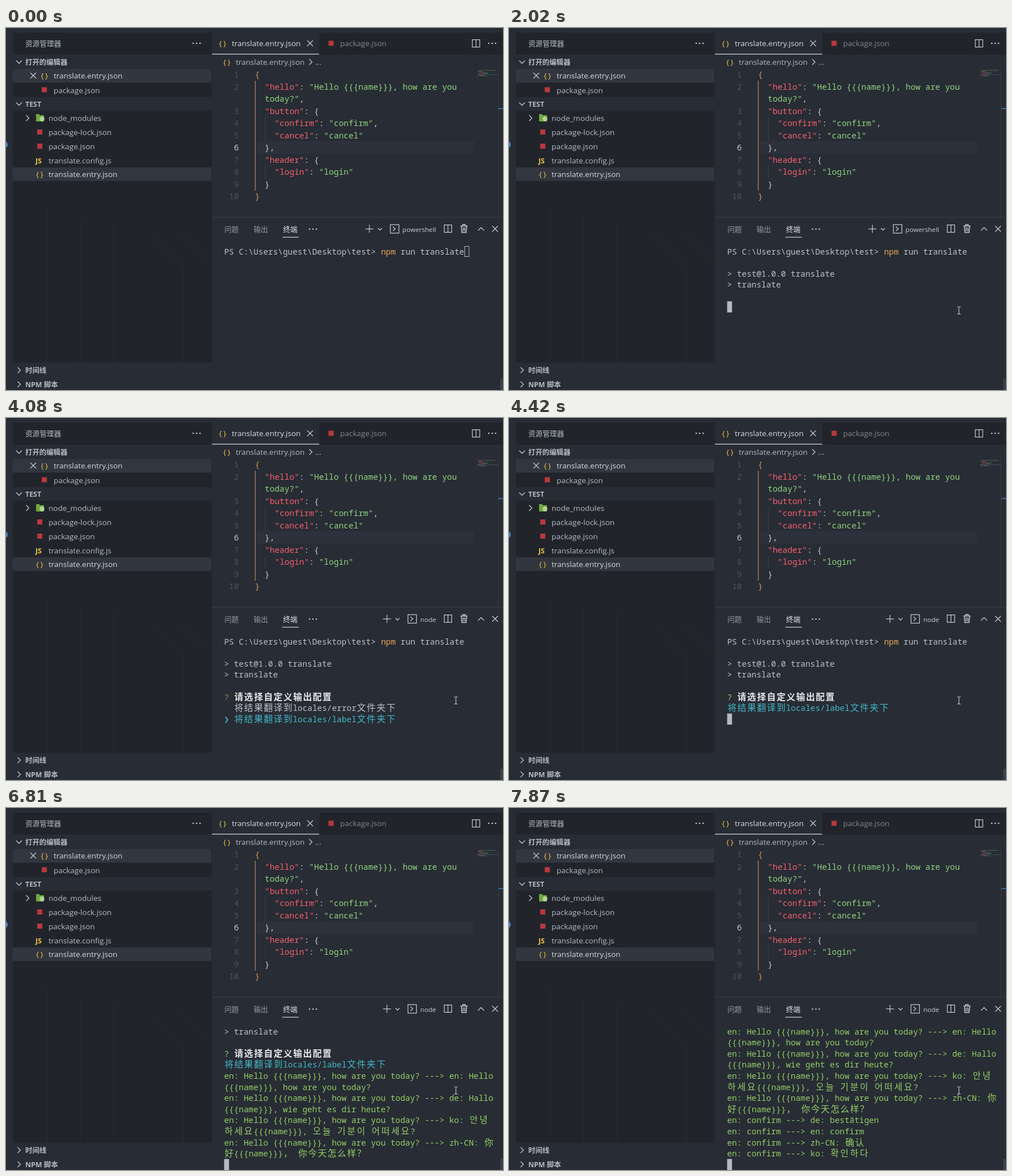
An HTML page that plays this animation: 876x639 px, repeating every 8000 ms.

```html
<!DOCTYPE html>
<html lang="zh">
<head>
<meta charset="utf-8">
<title>translate.entry.json</title>
<style>
html, body { margin: 0; width: 100%; height: 100%; overflow: hidden; background: #282c34; }
svg { display: block; }
text { white-space: pre; font: 13.5px "Open Sans", "Noto Sans CJK SC", sans-serif; fill: #b6bbc4; }
text.cn { font-size: 12.6px; }
text.head { font-size: 12.4px; font-weight: 700; }
text.small { font-size: 11.6px; fill: #ccd0d8; }
text.code, .term text { font-family: "Noto Sans Mono", "DejaVu Sans Mono", "Noto Sans CJK SC", monospace; font-weight: 500; }
text.code { font-size: 14.48px; }
.term text { font-size: 14.39px; }
.term text.wide { font-family: "Noto Sans CJK SC", "Noto Sans CJK KR", sans-serif; font-size: 15.7px; font-weight: 300; }
.term text.bold { font-weight: 700; fill: #e6e8ec; }
text.brace { font-size: 13px; fill: #e8bf4a; }
.icon { fill: none; stroke: #c5c9d1; stroke-width: 1.25; }
</style>
</head>
<body>
<svg id="stage" width="876" height="639" viewBox="0 0 876 639"></svg>
<script>
const rect = (x, y, w, h, fill, more = '') =>
  `<rect x="${x}" y="${y}" width="${w}" height="${h}" fill="${fill}" ${more}/>`;
const text = (x, y, s, cls = '', fill = '') =>
  `<text x="${x}" y="${y}" class="${cls}" ${fill && `style="fill:${fill}"`}>${s.replace(/</g, '&lt;')}</text>`;
const path = (d, more = '') => `<path class="icon" d="${d}" ${more}/>`;
const down = (x, y, r = 5) => path(`M${x - r} ${y - r / 2}l${r} ${r} ${r} ${-r}`);
const right = (x, y) => path(`M${x - 2.5} ${y - 5}l5 5-5 5`);
const cross = (x, y) => path(`M${x - 5} ${y - 5}l10 10m0-10l-10 10`);
const dots = (x, y) => [0, 6, 12].map(d => `<circle cx="${x + d}" cy="${y}" r="1.3" fill="#c5c9d1"/>`).join('');
const split = (x, y) => path(`M${x} ${y}h13v13h-13zm6.5 0v13`);
const braces = (x, y) => text(x, y, '{}', 'code brace');
const badge = (x, y) => rect(x - 4.5, y - 4.5, 9, 9, '#b8383d');

const RED = '#f4606e', GREEN = '#91d581', PLAIN = '#c6ccd6', ORANGE = '#d99a5c', DIM = '#4b5263';

function sidebar() {
  const side = '#21252b', row = '#31363f', bar = '#282c34';
  return rect(12, 8, 351, 583, side) + rect(12, 47, 351, 24.5, bar) + rect(12, 122, 351, 24, bar) +
    rect(12, 72, 350, 24.5, row) + rect(12, 246, 350, 24, row) +
    path('M72.5 318V590M131 336V590M190 345V590M255 362L312 423V590M305 360L362 415', 'style="stroke:#292d34;stroke-width:1"') +
    '<circle cx="-3" cy="206" r="6.2" fill="#4a80c4"/>' +
    text(34, 31.5, '资源管理器', 'cn') + dots(330, 27) +
    down(23, 60) + text(34, 64.5, '打开的编辑器', 'cn head') +
    cross(48, 84) + braces(60, 88.5) + text(84, 89, 'translate.entry.json', '', '#d6dae1') +
    badge(67.5, 109) + text(84, 114.5, 'package.json') +
    down(23, 134) + text(34, 138.5, 'TEST', 'head') +
    right(38, 159) + rect(53, 154, 14, 11, '#6fa83f', 'rx="1"') + rect(53, 152, 6, 4, '#6fa83f') +
    '<circle cx="63.5" cy="160.5" r="4.2" fill="#b5d39a"/>' + text(75, 164, 'node_modules') +
    badge(59.5, 183.5) + text(75, 189, 'package-lock.json') +
    badge(59.5, 208.5) + text(75, 213.5, 'package.json') +
    text(52, 238.5, 'JS', 'head', '#f0c63f') + text(75, 238.5, 'translate.config.js') +
    braces(51.5, 262.5) + text(75, 263, 'translate.entry.json', '', '#d6dae1') +
    right(23, 604) + text(34, 608.5, '时间线', 'cn head') +
    right(23, 629) + text(34, 633.5, 'NPM 脚本', 'cn head');
}

function editor() {
  const key = s => [s, RED], str = s => [s, GREEN], pun = s => [s, PLAIN];
  // [line number, indent, ...parts]
  const lines = [
    [1, 0, ['{', ORANGE]],
    [2, 2, key('"hello"'), pun(': '), str('"Hello {{{name}}}, how are you')],
    ['', 2, str('today?"'), pun(',')],
    [3, 2, key('"button"'), pun(': {')],
    [4, 4, key('"confirm"'), pun(': '), str('"confirm"'), pun(',')],
    [5, 4, key('"cancel"'), pun(': '), str('"cancel"')],
    [6, 2, pun('},')],
    [7, 2, key('"header"'), pun(': {')],
    [8, 4, key('"login"'), pun(': '), str('"login"')],
    [9, 2, pun('}')],
    [10, 0, ['}', ORANGE]]
  ];
  let out = rect(363, 8, 513, 39, '#21252b') + rect(363, 8, 189, 39, '#282c34') + rect(363, 45.5, 189, 1.3, '#d0d3d9') +
    braces(374, 31.5) + text(398, 32, 'translate.entry.json', '', '#dadde3') + cross(536, 27) +
    badge(573, 27) + text(589, 32, 'package.json', '', '#80858e') + split(822, 20.5) + dots(851, 27) +
    braces(381.5, 64.5) + text(405, 65, 'translate.entry.json') + right(537, 60) + text(545, 65, '...') +
    rect(442, 200, 383, 22, '#2d313c') + rect(438.7, 93, 1.4, 194, '#a87f55') +
    rect(456.5, 157, 1, 43, '#3d424c') + rect(456.5, 243, 1, 22, '#3d424c') +
    rect(867, 72, 1, 262, '#373c45') + rect(868, 141.5, 8, 1.5, '#3f7fc0') + rect(830, 82, 38, 1, '#3a5263');
  lines.forEach(([num, indent, ...parts], i) => {
    const y = 87.2 + i * 21.5;
    let x = 438.7 + indent * 8.69;
    num = String(num);
    out += text(410.5 - num.length * 8.69, y, num, 'code', num === '6' ? '#c5c8d0' : DIM);
    let m = 830 + indent;
    for (const [s, fill] of parts) {
      out += text(x, y, s, 'code', fill) + rect(m, 73 + i * 1.4, s.length * .8, .9, fill, 'opacity=".38"');
      x += s.length * 8.69;
      m += s.length * .8;
    }
  });
  return out;
}

function panel() {
  return rect(363, 333.5, 513, 1, '#3c414b') +
    path('M385 423V590M545.5 423V590M627 423V590M653 423V590M813.5 423V590', 'style="stroke:#2b2f37;stroke-width:1"') +
    text(385, 359.5, '问题', 'cn', '#949aa5') + text(436.5, 359.5, '输出', 'cn', '#949aa5') +
    text(488.5, 359.5, '终端', 'cn', '#dfe2e7') + rect(487, 368.7, 29, 1.2, '#d0d3d9') + dots(535, 355) +
    `<g id="tools">${path('M633.5 354.5h14m-7-7v14')}${down(659, 355, 3.5)}${path('M677.5 347h15v15h-15zm4.5 3.7l4 3.8-4 3.8')}</g>` +
    '<text id="shell" class="small" x="758" y="359.5" text-anchor="end"></text>' + split(772.5, 347.5) +
    path('M801 349.5h12.5M805 349v-2h4.5v2M802.5 350l1 11h7.5l1-11M805.7 352v7M808.8 352v7', 'style="stroke-width:1.5"') +
    path('M832 357.5l5.3-5.3 5.3 5.3') + cross(862, 354.5) + rect(871, 619, 5, 20, '#3b404a') +
    '<g id="term" class="term"></g>' +
    `<g id="mouse">${path('M-3-6.3h2l1 1 1-1h2M0-5V5.5M-3 6.5h2l1-1 1 1h2', 'style="stroke-width:1;stroke:#dfe2e7"')}</g>`;
}

stage.innerHTML = rect(0, 0, 876, 639, '#282c34') + sidebar() + editor() + panel();

// Terminal: a grid where wide characters take two cells
const CELL = 8.64, ROW = 19.58, LEFT = 384.5, FG = '#bcc2cd', LIME = '#94cf68', CYAN = '#42b8c9';

function drawLine(parts, row) {
  let col = 0, out = '';
  for (const [s, fill, cls = ''] of parts)
    for (const run of s.match(/[\u3000-\uffef]|[^\u3000-\uffef]+/g)) {
      const wide = run >= '\u3000';
      out += text(LEFT + col * CELL + (wide ? .8 : 0), 399.7 + row * ROW, run, (wide ? 'wide ' : '') + cls, fill);
      col += wide ? 2 : run.length;
    }
  return out;
}

const green = s => [[s, LIME]], plain = s => [[s, FG]];
const asked = 'en: Hello {{{name}}}, how are you today? ---> ';
const title = '请选择自定义输出配置';
const option = name => `将结果翻译到locales/${name}文件夹下`;
const ask = (mark, hint) => [['? ', mark], [title, '', 'bold'], [hint, FG]].filter(p => p[0]);
const log = [
  [['PS C:\\Users\\guest\\Desktop\\test> ', FG], ['npm', '#e5a855'], [' run translate', FG]],
  [], plain('> test@1.0.0 translate'), plain('> translate'), [],
  ask(LIME, ''), [[option('label'), CYAN]],
  green(asked + 'en: Hello'), green('{{{name}}}, how are you today?'),
  green(asked + 'de: Hallo'), green('{{{name}}}, wie geht es dir heute?'),
  green(asked + 'ko: 안녕'), green('하세요{{{name}}}, 오늘 기분이 어떠세요?'),
  green(asked + 'zh-CN: 你'), green('好{{{name}}}， 你今天怎么样？'),
  ...['de: bestätigen', 'en: confirm', 'zh-CN: 确认', 'ko: 확인하다'].map(s => green('en: confirm ---> ' + s))
];
const intro = log.slice(0, 5);
const menu = [...intro, ask('#94905a', ' (Use arrow keys)'), [['❯ ' + option('error'), CYAN]], plain('  ' + option('label'))];
const moved = [...intro, ask('#94905a', ''), plain('  ' + option('error')), [['❯ ' + option('label'), CYAN]]];
const covered = [...log.slice(0, 12), [['하', '#4b515c'], ['세요{{{name}}}, 오늘 기분이 어떠세요?', LIME]]];

const hollow = rect(808.5, 385.5, 7.5, 18, 'none', 'stroke="#b4bac5"');
const block = (row, col = 0, w = 8.6) => rect(LEFT + col * CELL, 384.6 + row * ROW, w, 19.6, '#b4bac5');

// [start ms, lines, cursor]
const steps = [
  [0, log.slice(0, 1), hollow],
  [700, log.slice(0, 1), block(0, 49)],
  [1620, log.slice(0, 1), block(1)],
  [2020, intro, block(5)],
  [2820, menu, ''],
  [4080, moved, ''],
  [4350, log.slice(0, 7), ''],
  [4420, log.slice(0, 7), block(7)],
  [6740, covered, block(12, 0, 17)],
  [6810, log.slice(3, 15), block(12)],
  [7800, log.slice(6, 18), block(12)],
  [7870, log.slice(7), block(12)]
];

const el = id => document.getElementById(id);
const curve = (a, b, c, u) => a * (1 - u) ** 2 + 2 * b * u * (1 - u) + c * u * u;
let shown;

function frame(now) {
  const t = now % 8000;
  const step = steps.findLast(s => s[0] <= t);
  if (step !== shown) {
    shown = step;
    el('term').innerHTML = step[2] + step[1].map(drawLine).join('');
  }
  const node = t >= 2890;
  el('shell').textContent = node ? 'node' : 'powershell';
  el('tools').setAttribute('transform', `translate(${node ? 31 : 0})`);
  // The pointer glides in, sampled every 70 ms
  const u = Math.min(1, Math.max(0, Math.floor((t - 140) / 70) / 7));
  el('mouse').setAttribute('visibility', t < 140 ? 'hidden' : 'visible');
  el('mouse').setAttribute('transform', `translate(${curve(831, 770, 793, u)} ${curve(598, 530, 498.5, u)})`);
  requestAnimationFrame(frame);
}
requestAnimationFrame(frame);
</script>
</body>
</html>
```
